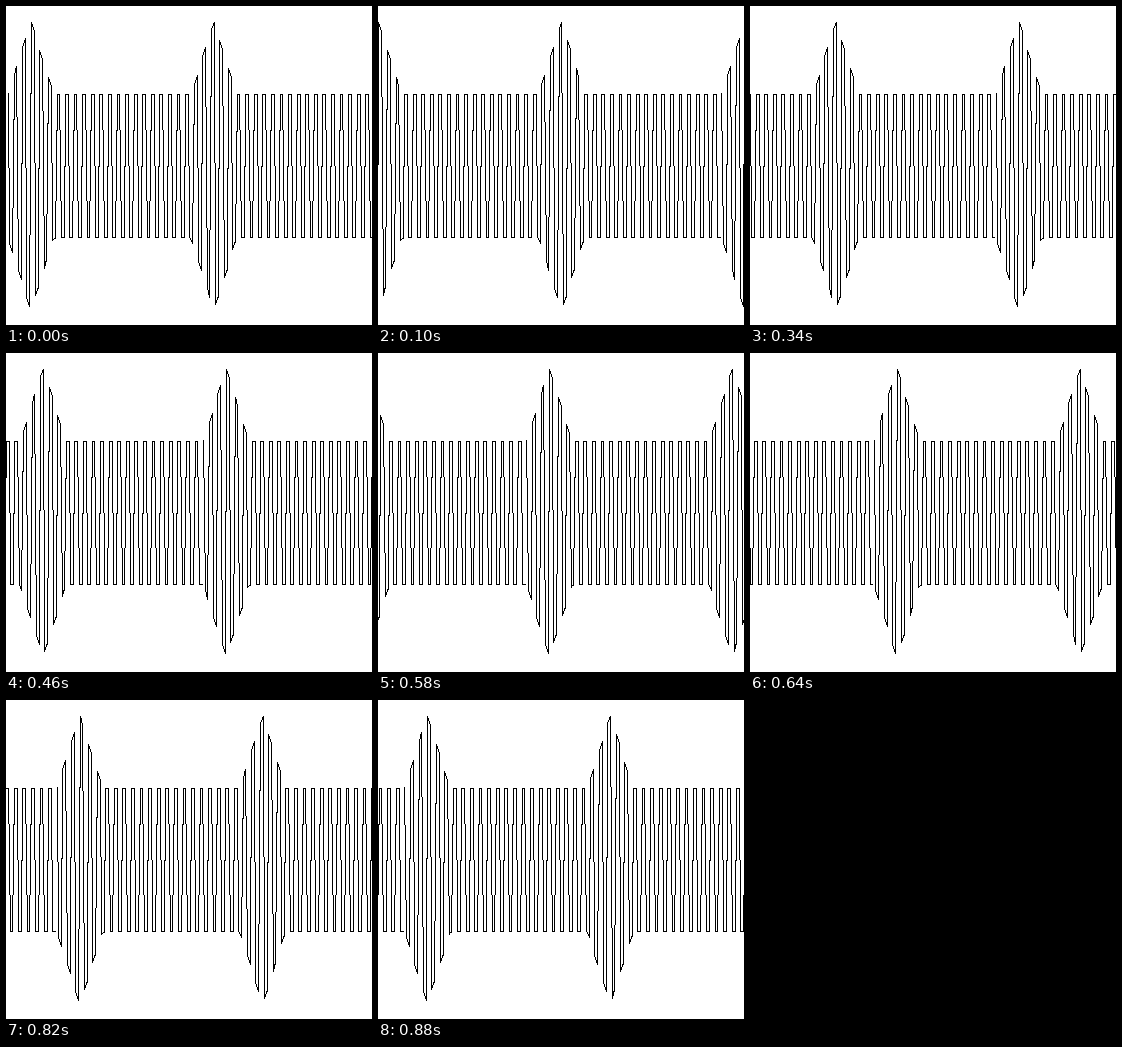
Animation, 366 px wide and 319 px high, one loop 940 ms. Source, as an HTML page with a canvas:

```html
<!DOCTYPE html>
<html lang="en">
<head>
<meta charset="utf-8">
<title>Pulsed wave</title>
<style>
  html, body { margin: 0; width: 100%; height: 100%; overflow: hidden; background: #fff; }
  canvas { display: block; }
</style>
</head>
<body>
<canvas id="stage" width="366" height="319"></canvas>
<script>
const W = 366, H = 319;
const MID = 159.5, AMP = 71.5, BOOST = 73;
const PULSE = W / 2, HALF_WIDTH = PULSE / 8, PEAK = 24.4;
const HALF = W / 16 * 3 / 16;          // half a carrier period
const EDGE = 1.48;                     // width of a rise or fall
const STEP = W / 15;
const ctx = document.getElementById('stage').getContext('2d');

// Carrier level plus a triangular boost around each pulse centre
function envelope(x) {
  const d = Math.abs(x - PEAK - PULSE * Math.round((x - PEAK) / PULSE));
  return AMP + BOOST * Math.max(0, 1 - d / HALF_WIDTH);
}

function buildWave() {
  const pts = [];
  const add = (x, sign) => pts.push([x, MID - sign * envelope(x)]);
  const first = 24.78 - 5 * HALF;
  add(first - EDGE, 1);
  for (let k = 0; k < 85; k++) {
    const x = first + k * HALF, sign = k % 2 ? 1 : -1;
    add(x, sign);
    add(x + HALF - EDGE, sign);
  }
  return pts;
}

// Hard-edged line, one vertical run per pixel column
function line(x0, y0, x1, y1) {
  const dx = x1 - x0, dy = y1 - y0;
  for (let c = 0; c <= dx; c++) {
    const a = dx ? y0 + dy * Math.max(0, c - 0.5) / dx : y0;
    const b = dx ? y0 + dy * Math.min(dx, c + 0.5) / dx : y1;
    const top = Math.round(Math.min(a, b));
    const bottom = Math.round(Math.max(a, b));
    ctx.fillRect(x0 + c, top, 1, Math.max(1, bottom - top + (c === dx || dy === 0 ? 1 : 0)));
  }
}

const wave = buildWave();

function draw(step) {
  ctx.fillStyle = '#fff';
  ctx.fillRect(0, 0, W, H);
  ctx.fillStyle = '#000';
  for (const shift of [-step * STEP, W - step * STEP]) {
    let prev = null;
    for (const [x, y] of wave) {
      const p = [Math.round(x + shift), Math.round(y)];
      if (prev && p[0] >= 0 && prev[0] < W) line(...prev, ...p);
      prev = p;
    }
  }
}

const start = performance.now();
let shown = -1;

function tick() {
  const t = (performance.now() - start) % 940;
  const step = t < 100 ? 0 : 1 + Math.floor((t - 100) / 60);
  if (step !== shown) draw(shown = step);
  requestAnimationFrame(tick);
}
tick();
</script>
</body>
</html>
```
